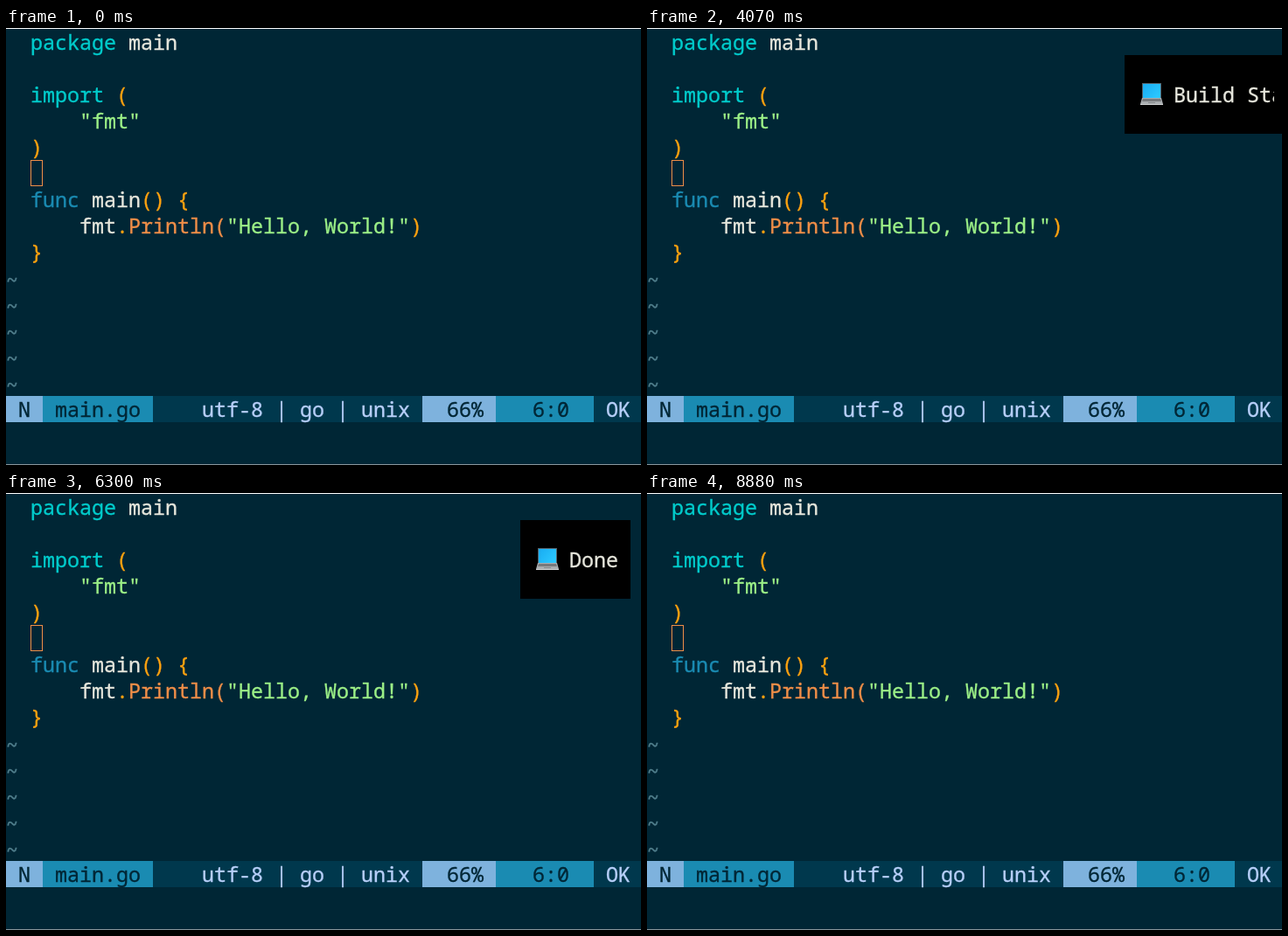
An HTML page with a canvas for the animation above (9.81 s loop, 726 by 500 pixels).

```html
<!DOCTYPE html>
<html lang="en">
<head>
<meta charset="utf-8">
<title>Build notification</title>
<style>
  html, body { margin: 0; width: 100%; height: 100%; overflow: hidden; background: #002635; }
  canvas { display: block; }
</style>
</head>
<body>
<canvas id="stage" width="726" height="500"></canvas>
<script>
const ctx = document.getElementById('stage').getContext('2d');
const W = 726, H = 500, CW = 14, CH = 30, BASE = 24, LOOP = 9810;
const FONT = '23.333px "Noto Sans Mono", "DejaVu Sans Mono", monospace';
const C = {
  bg: '#002635', bar: '#00384d', ice: '#7eb2dd', blue: '#1a8bb2', cyan: '#00cccc',
  text: '#e6e6dc', green: '#9cf087', amber: '#ffa20f', orange: '#f08e48',
  tilde: '#517f8d', lavender: '#b7cff9'
};

// Each entry: row, column, text, colour
const code = [
  [0, 2, 'package', C.cyan], [0, 10, 'main', C.text],
  [2, 2, 'import', C.cyan], [2, 9, '(', C.amber],
  [3, 6, '"fmt"', C.green],
  [4, 2, ')', C.amber],
  [6, 2, 'func', C.blue], [6, 7, 'main', C.text], [6, 11, '()', C.amber], [6, 14, '{', C.amber],
  [7, 6, 'fmt', C.text], [7, 9, '.', C.amber], [7, 10, 'Println(', C.orange],
  [7, 18, '"Hello, World!"', C.green], [7, 33, ')', C.amber],
  [8, 2, '}', C.amber]
];

// Each entry: start column, text column, text, background, colour
const status = [
  [0, 1, 'N', C.ice, C.bg],
  [3, 4, 'main.go', C.blue, C.bg],
  [12, 16, 'utf-8 | go | unix', C.bar, C.lavender],
  [34, 36, '66%', C.ice, C.bg],
  [40, 43, '6:0', C.blue, C.bg],
  [48, 49, 'OK', C.bar, C.lavender]
];

const rowY = row => 1 + row * CH;

function rect(x, y, w, h, color) {
  ctx.fillStyle = color;
  ctx.fillRect(x, y, w, h);
}

// A hairline outline gives the text its slightly heavier weight
function write(row, col, text, color, drop = 0) {
  const x = col * CW, y = rowY(row) + BASE + drop;
  ctx.fillStyle = ctx.strokeStyle = color;
  ctx.lineWidth = 0.35;
  ctx.fillText(text, x, y);
  ctx.strokeText(text, x, y);
}

function poly(color, ...pts) {
  ctx.fillStyle = color;
  ctx.beginPath();
  for (let i = 0; i < pts.length; i += 2) ctx.lineTo(pts[i], pts[i + 1]);
  ctx.fill();
}

// Index of the current step, n picture changes spread from a to b
function stepAt(t, a, b, n) {
  const k = Math.floor((t - a) / (b - a) * (n - 1) + 1e-6);
  return Math.max(0, Math.min(n - 1, k));
}

const snap = (t, a, b, n) => a + stepAt(t, a, b, n) * (b - a) / (n - 1);

function drawEditor() {
  rect(0, 0, W, H, C.bg);
  for (const part of code) write(...part);
  for (let row = 9; row < 14; row++) write(row, 0, '~', C.tilde, 2);
  for (const [start, col, text, back, color] of status) {
    rect(start * CW, rowY(14), W - start * CW, CH, back);
    write(14, col, text, color);
  }
  rect(0, 0, W, 1, '#fff');
  rect(0, H - 1, W, 1, '#8a979d');
}

function drawCaret() {
  ctx.strokeStyle = C.orange;
  ctx.lineWidth = 1;
  ctx.strokeRect(2 * CW + 0.5, rowY(5) + 0.5, CW - 1, CH - 1);
}

function drawLaptop(x, y) {
  rect(x + 2, y, 22, 18, '#53616b');
  const glass = ctx.createLinearGradient(x, y, x + 20, y + 17);
  glass.addColorStop(0, '#16a9f0');
  glass.addColorStop(1, '#2cc8ff');
  rect(x + 3, y + 1, 20, 16, glass);
  poly('#a9adb0', x + 2, y + 17, x + 24, y + 17, x + 26, y + 24, x, y + 24);
  poly('#77797c', x + 3, y + 18, x + 23, y + 18, x + 24, y + 21, x + 2, y + 21);
  rect(x + 9, y + 22, 8, 1, '#85888b');
  rect(x, y + 24, 26, 1, '#d2d4d5');
}

function drawPopup(col, text) {
  const x = col * CW;
  rect(x, 31, (text.length + 5) * CW, 90, '#000');
  ctx.save();
  ctx.beginPath();
  ctx.rect(0, 0, 717, H);
  ctx.clip();
  drawLaptop(x + 18, 63);
  write(2, col + 4, text, C.text);
  ctx.restore();
}

const hand = new Path2D(
  'M5.5 2 Q5.5 .5 7 .5 Q8.5 .5 8.5 2 V7 Q10.8 6.2 11.3 8 Q13.3 7.2 13.8 9 ' +
  'Q16.3 8.4 16.3 11 V15 Q16.3 18 14.5 19.5 V21.5 H6.5 V19.5 L1 13 ' +
  'Q.1 11.4 1.5 10.7 Q2.8 10.2 4 11.6 L5.5 13.2 Z');

function drawHand(x, y) {
  ctx.save();
  ctx.translate(x, y);
  ctx.fillStyle = '#fff';
  ctx.fill(hand);
  ctx.strokeStyle = '#000';
  ctx.lineWidth = 0.8;
  ctx.stroke(hand);
  ctx.lineWidth = 0.7;
  ctx.beginPath();
  for (const gx of [8.5, 11.2, 13.8]) {
    ctx.moveTo(gx, 8);
    ctx.lineTo(gx, 11.5);
  }
  ctx.stroke();
  ctx.restore();
}

// The popup moves one column every 20 ms
const columns = (t, start) => Math.floor((t - start) / 20 + 1e-6);

function popupAt(t) {
  if (t >= 2220 && t < 4070) {
    const s = t < 2250 ? 2220 : snap(t, 2250, 2480, 6);
    return [Math.max(33, 46 - columns(s, 2220)), 'Build Started'];
  }
  if (t >= 4070 && t < 4310) return [39 + columns(snap(t, 4070, 4310, 6), 4070), 'Build Started'];
  if (t >= 6180 && t < 7670) return [48 - columns(snap(t, 6180, 6300, 3), 6180), 'Done'];
  if (t >= 7670 && t < 8190) return [42 + Math.max(0, columns(snap(t, 7670, 8190, 11), 7770)), 'Done'];
  return null;
}

// The caret flickers off on every second step while a popup moves
function caretOn(t) {
  const spans = [[2220, 2480, 7], [4070, 4310, 6], [6180, 6300, 3], [7774, 7982, 5]];
  return !spans.some(([a, b, n]) => t >= a && t < b && stepAt(t, a, b, n) % 2);
}

const ease = p => p * p * (3 - 2 * p);
const lerp = (a, b, p) => Math.round(a + (b - a) * p);

function handAt(t) {
  if (t < 6830 || t >= 8880) return null;
  if (t < 7670) {
    const p = ease(stepAt(t, 6830, 7080, 6) / 5);
    return [lerp(692, 649, p), lerp(211, 329, p)];
  }
  const p = ease((stepAt(t, 7670, 8190, 11) + 0.5) / 10.5);
  return [lerp(649, 547, p), lerp(329, 385, p)];
}

function render(t) {
  ctx.font = FONT;
  drawEditor();
  if (caretOn(t)) drawCaret();
  const popup = popupAt(t);
  if (popup && popup[0] < 51) drawPopup(...popup);
  const pos = handAt(t);
  if (pos) drawHand(...pos);
}

const began = performance.now();
function tick() {
  render((performance.now() - began) % LOOP);
  requestAnimationFrame(tick);
}
tick();
</script>
</body>
</html>
```
